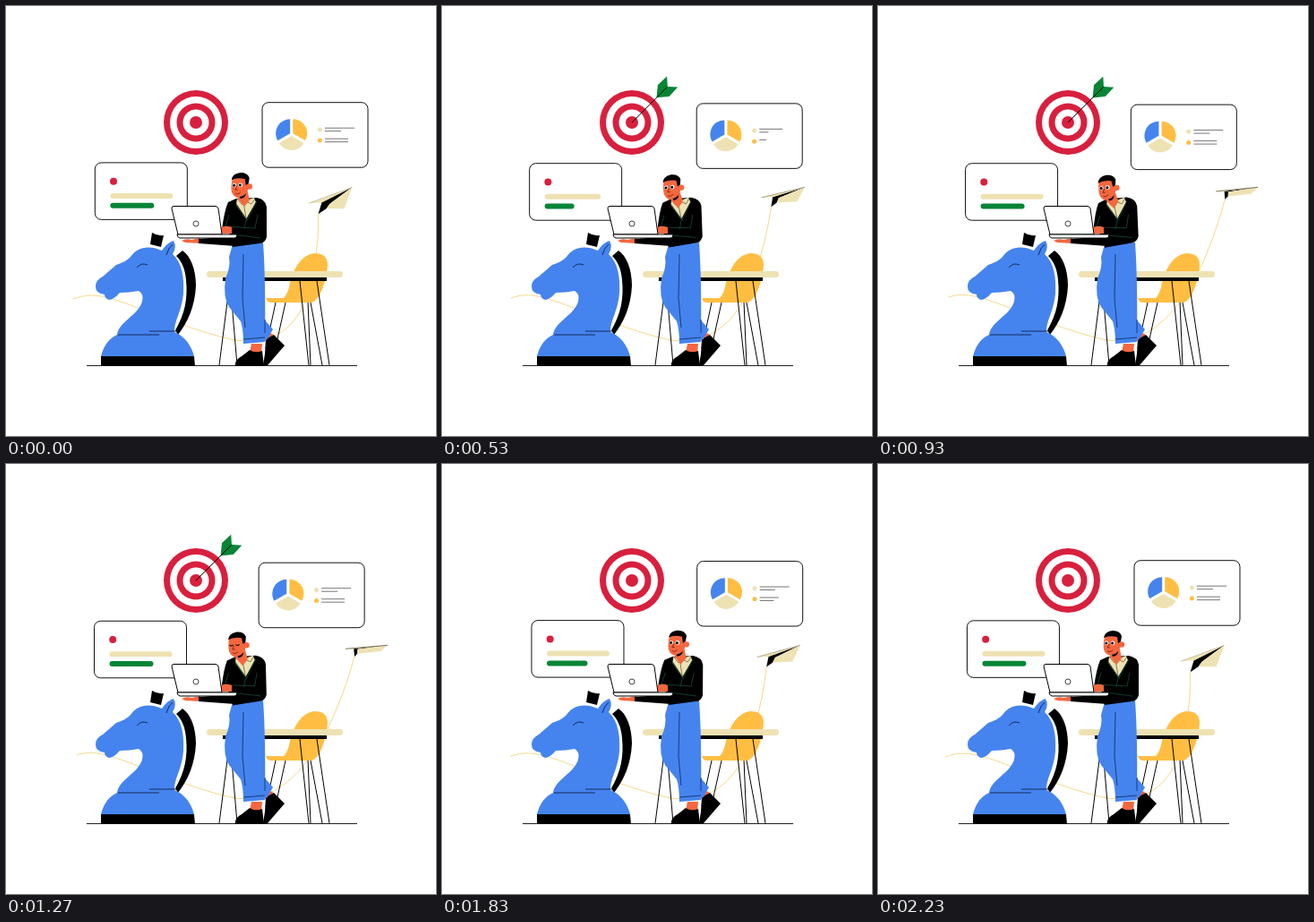
These frames come from a looping animation (480x480 px, 2270 ms). An HTML page with a canvas:

```html
<!DOCTYPE html>
<html lang="en">
<head>
<meta charset="utf-8">
<title>Strategy at work</title>
<style>
html, body { margin: 0; height: 100%; overflow: hidden; background: #fff; }
canvas { display: block; width: 480px; height: 480px; }
</style>
</head>
<body>
<canvas id="stage" width="480" height="480"></canvas>
<script>
const ctx = document.getElementById('stage').getContext('2d');
const LOOP = 2270, HALF = LOOP / 2;
const BLUE = '#4584ee', RED = '#d8203e', GREEN = '#078536', CREAM = '#eee2b3',
  YELLOW = '#ffbe42', SKIN = '#f4673f', BLACK = '#000', WHITE = '#fff', SEAM = '#123c2b';

const clamp = v => Math.min(1, Math.max(0, v));
const mix = (a, b, p) => a + (b - a) * p;
const ramp = (t, from, to) => clamp((t - from) / (to - from));
const smooth = p => p * p * (3 - 2 * p);
const wave = (t, peak) => Math.cos(2 * Math.PI * (t - peak) / LOOP);

function fill(d, color) {
  ctx.fillStyle = color;
  ctx.fill(new Path2D(d));
}
function line(d, color = BLACK, width = 1) {
  ctx.strokeStyle = color;
  ctx.lineWidth = width;
  ctx.stroke(new Path2D(d));
}
function shape(d, color, edge = BLACK, width = 1) {
  fill(d, color);
  line(d, edge, width);
}
function disc(x, y, r, color) {
  ctx.fillStyle = color;
  ctx.beginPath();
  ctx.arc(x, y, r, 0, 7);
  ctx.fill();
}
function pill(x, y, w, h, color) {
  ctx.fillStyle = color;
  ctx.beginPath();
  ctx.roundRect(x, y, w, h, h / 2);
  ctx.fill();
}
function at(x, y, angle, draw) {
  ctx.save();
  ctx.translate(x, y);
  ctx.rotate(angle);
  draw();
  ctx.restore();
}
function turnAbout(x, y, angle, draw) {
  at(x, y, angle, () => {
    ctx.translate(-x, -y);
    draw();
  });
}
function panel(w, h) {
  ctx.beginPath();
  ctx.roundRect(0, 0, w, h, 7);
  ctx.fillStyle = WHITE;
  ctx.fill();
  ctx.strokeStyle = '#111';
  ctx.lineWidth = 1;
  ctx.stroke();
}

function target() {
  [36, 29, 21.5, 14.5, 7].forEach((r, i) => disc(212, 130, r, i % 2 ? WHITE : RED));
}

function arrow(t) {
  if (t < 50 || t > 1435) return;
  const away = Math.max(0, 301 - t) * 1.2;
  const wobble = t > 300 ? 2 * Math.exp(-(t - 300) / 180) * Math.sin((t - 300) / 35) : 0;
  const degrees = 45 - 6 * clamp(away / 36) + wobble;
  at(212 + away, 130 - away * (away > 38 ? 0.37 : 0.41), -degrees * Math.PI / 180, () => {
    fill('M39 0L50 -9L64 -8.5L56.5 0L64 8.5L50 9Z', GREEN);
    line('M0 0H56', BLACK, 0.9);
  });
}

function chartCard(t) {
  const c = wave(t, 0), u = t % HALF;
  at(284 + 2 * c, 109 - 1.3 * c, 0, () => {
    panel(118, 72.5);
    [[YELLOW, -30], [CREAM, 90], [BLUE, 210]].forEach(([color, deg]) => {
      const a = deg * Math.PI / 180, x = 32.7 + 1.8 * Math.cos(a), y = 35.5 + 1.8 * Math.sin(a);
      ctx.fillStyle = color;
      ctx.beginPath();
      ctx.moveTo(x, y);
      ctx.arc(x, y, 16, a - Math.PI / 3, a + Math.PI / 3);
      ctx.fill();
    });
    disc(64.4, 30.2, 2.5, CREAM);
    disc(64.4, 42.3, 2.5, YELLOW);
    [[28.5, 33], [32, 18], [40.5, 26], [44, 26]].forEach(([y, length], i) => {
      const eraseAt = [150, 200, 275, 350][i], drawAt = 300 + i * 77;
      const erased = ramp(u, eraseAt, eraseAt + 170);
      const drawn = Math.sin(ramp(u, drawAt, drawAt + 400) * Math.PI / 2);
      if (erased < 1) line(`M${70 + length * erased} ${y}H${70 + length}`, '#777');
      if (drawn > 0) line(`M70 ${y}h${length * drawn}`, '#777');
    });
  });
}

function listCard(t) {
  const c = wave(t, 1890), u = t % HALF;
  const bar = (full, low, start, mid, end) =>
    u < mid ? mix(full, low, smooth(ramp(u, start, mid))) : mix(low, full, smooth(ramp(u, mid, end)));
  at(98.7 + 1.3 * c, 175.2 - 0.6 * c, 0, () => {
    panel(103, 63.5);
    disc(20.7, 20.8, 4, RED);
    pill(17, 34, bar(70, 44, 135, 310, 650), 6, CREAM);
    pill(17, 44.8, bar(49, 27, 130, 390, 800), 6, GREEN);
  });
}

function paperPlane(t) {
  const c = wave(t, 0), s = (1 - c) / 2;
  const x = 407 - 20.5 * c;
  const point = (x0, y0, x1, y1) => `${x + mix(x0, x1, s)} ${202.3 + mix(y0, y1, s)}`;
  const tip = `${x} 202.3`, wing = point(-49, 18, -47, 3.5), fold = point(-34, 17, -38, 3.5),
    tail = point(-38, 30, -37, 12), keel = point(-29, 24, -34, 9), inner = point(-25, 18.5, -34, 4);
  line(`M${mix(75, 79, s)} ${mix(327, 325, s)}C98 318 118 326 150 338S212 363 255 373
    C${mix(305, 298, s)} 379 331 ${mix(355, 345, s)} ${mix(342, 356, s)} ${mix(302, 303, s)}
    Q${mix(350, 378, s)} ${mix(260, 260, s)} ${tail}`, '#f5d98c');
  fill(`M${tip}L${fold}L${tail}L${keel}L${inner}Z`, BLACK);
  fill(`M${tip}L${wing}L${fold}Z`, CREAM);
  fill(`M${tip}L${inner}L${keel}L${point(-9, 24, -8, 6)}Z`, CREAM);
  line(`M${tip}L${wing}`, '#6b6348', mix(0.3, 0.9, s));
}

function furniture() {
  line('M301 331L290 382M312 331L299 390M337 330L340 401M340 331L353 401');
  fill('M290 326H310Q315 321 317 309C322 291 330 278 344 276Q359 276 359 289C358 303 352 328 341 331H296Q291 331 290 326Z', YELLOW);
  line('M250 307L238 401M250 307L258 401M328 307L338 401M347 307L361 401');
  fill('M242 302H358V307H242Z', BLACK);
  pill(224, 296, 152, 7, CREAM);
}

function horse() {
  fill('M163 253Q169 257 176 256L173 269L161 266Z', BLACK);
  fill('M190 279L197 273C206 279 212 294 212 312C211 335 203 353 192 367L189 362C200 343 203 326 201 306C200 293 196 285 190 279Z', BLACK);
  fill(`M174 273Q180 264 187 262Q191 269 186 277C197 287 199 304 198 321C196 342 188 350 188 364
    C199 368 207 379 210 391H106C109 379 115 371 124 367C126 352 147 346 152 330Q154 321 148 318
    Q138 320 127 320Q120 328 115 328Q110 326 110 322Q100 321 100 313Q100 306 108 302
    L123 289Q135 285 139 280C146 270 158 266 174 273Z`, BLUE);
  line('M146 292Q151 286 158 289M179 278Q181 270 186 266M125 367H171M160 363H190', '#142b5c');
  fill('M106 391H210L211 402H106Z', BLACK);
}

function legs() {
  fill('M274 377H286L285 387H272ZM289 364L298 366L296 376L288 373Z', SKIN);
  fill('M290 372L299 367L311 379L292 401H287L289 388Z', BLACK);
  fill('M256 402Q255 395 263 391L272 384Q278 388 286 385L288 402Z', BLACK);
  fill('M284 345L298 361L291 373L280 365Z', BLUE);
  fill('M253 266L287 264Q290 306 289 375L265 377Q265 361 262 352L249 336Q242 325 245 304Q251 291 249 280Z', BLUE);
  line('M265 277L264 326Q266 348 267 359M265 372L289 370M289 350V365', '#183d80');
}

function head(blinking) {
  fill('M260 207L270 207L272 217L266 224L259 215Z', SKIN);
  fill('M253 193Q251 201 252 207Q254 214 261 214Q269 212 271 203Q271 193 265 190Z', SKIN);
  disc(272, 201.5, 3.2, SKIN);
  fill('M252 194Q253 187 262 186Q270 186 272 192L271 198L268 200L267 193Q258 191 252 194Z', BLACK);
  fill('M261 213Q266 212 268 209Q268 214 262 215Z', BLACK);
  if (blinking) {
    line('M253 200Q255 202 257 200M260 200Q262 202 264 200');
  } else {
    disc(255, 199.8, 2.2, WHITE);
    disc(262, 199.8, 2.4, WHITE);
    disc(254.8, 200, 1.5, BLACK);
    disc(261.6, 200, 1.5, BLACK);
  }
  line('M258 201L256 205H259M256 209Q259 211 262 208', '#7d2717', 0.9);
}

function man(t) {
  const c = wave(t, 1950), sway = c - 0.7;
  legs();
  fill('M196 262Q201 259 207 261L217 259V265L200 264Z', SKIN);
  fill('M258 257L215 260V265L256 268Z', BLACK);
  turnAbout(270, 265, sway * 0.026, () => {
    fill('M257 215L280 214Q290 216 291 224L291 258Q289 265 283 265L253 269L252 256L241 249Q244 228 248 219Z', BLACK);
    fill('M258 215L265 218L277 214L279 219L268 238L257 222Z', CREAM);
    line('M265 218L268 237M258 215L264 222L268 218L274 221L278 215', '#554e36', 0.7);
    line('M257 221L269 239L280 218M249 233L245 246L278 248L281 233M268 239L266 249M253 255L284 259', SEAM);
    turnAbout(266, 216, sway * 0.05, () => {
      ctx.translate(sway * 1.1, -sway);
      head(t > 1200 && t < 1330);
    });
  });
  fill('M239 248Q244 244 252 247L252 254H241Z', SKIN);
}

function laptop() {
  shape('M187 223.5H234Q236 223.5 237 226L241 255H192L185 226Q185 223.5 187 223.5Z', WHITE);
  ctx.strokeStyle = '#444';
  ctx.lineWidth = 1;
  ctx.beginPath();
  ctx.arc(212, 243, 3, 0, 7);
  ctx.stroke();
  shape('M191 255H258Q258 259 255 259H194Q191 258 191 255Z', WHITE);
}

function frame(now) {
  const t = now % LOOP;
  ctx.fillStyle = WHITE;
  ctx.fillRect(0, 0, 480, 480);
  target();
  arrow(t);
  chartCard(t);
  listCard(t);
  paperPlane(t);
  furniture();
  line('M90 401.5H392', '#222');
  horse();
  man(t);
  laptop();
}

const start = performance.now();
function tick() {
  frame(performance.now() - start);
  requestAnimationFrame(tick);
}
tick();
</script>
</body>
</html>
```
